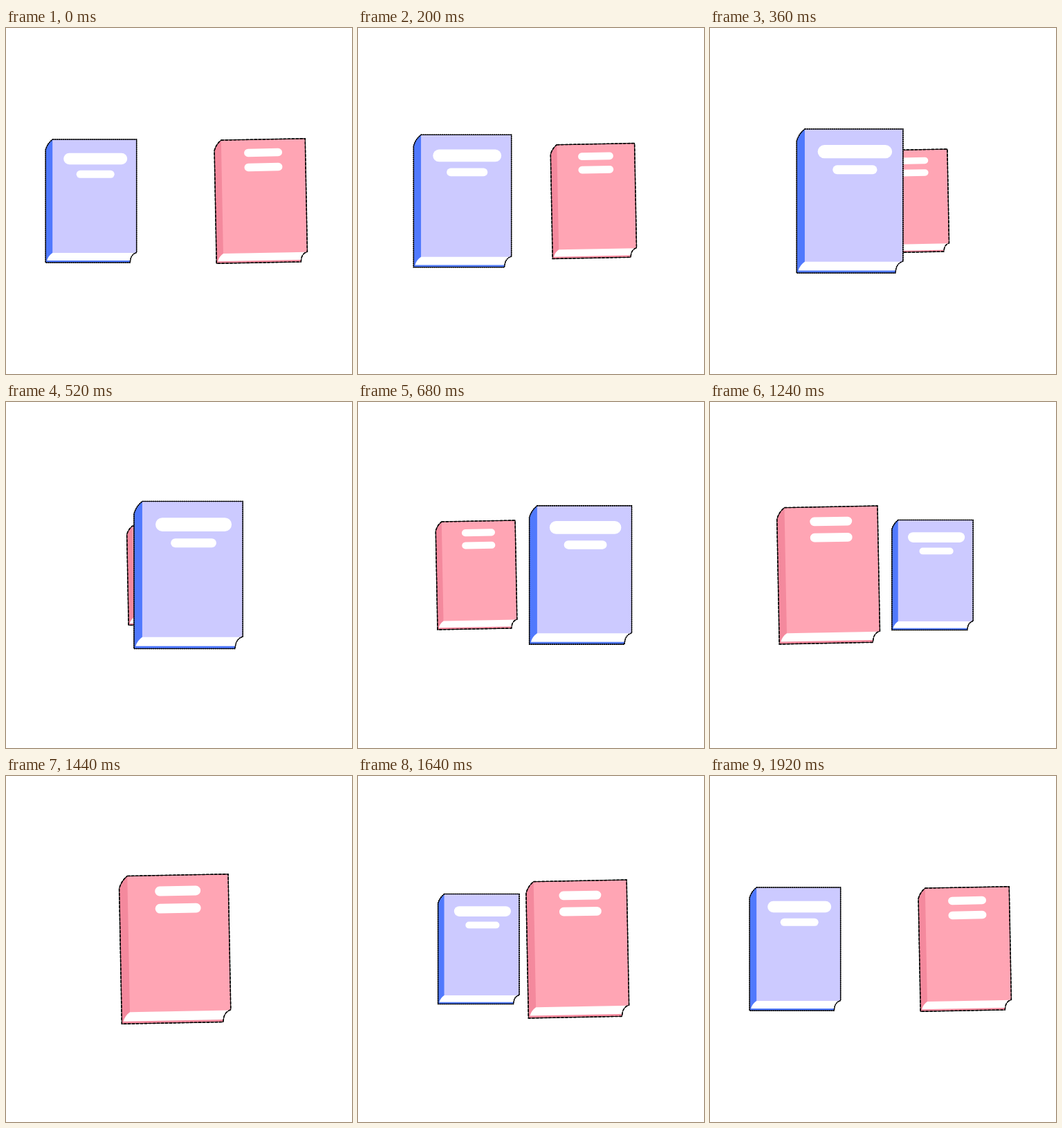
An HTML page with a canvas that plays this animation: 500 px wide and 500 px high, repeating every 1.96 s.

```html
<!DOCTYPE html>
<html lang="en">
<head>
<meta charset="utf-8">
<title>Two books trading places</title>
<style>
  html, body { margin: 0; width: 100%; height: 100%; overflow: hidden; background: #fff; }
  canvas { display: block; width: 500px; height: 500px; }
</style>
</head>
<body>
<canvas id="stage" width="500" height="500"></canvas>
<script>
const ctx = document.getElementById('stage').getContext('2d');

const LOOP = 1960, STEP = 40, SWAP = 960;

const blue = {
  cover: '#cccaff', spine: '#5079fd', tilt: 0, dash: [2, 1],
  mid: 247.7, reach: -125, // starts on the left
  labels: [[6.5, -61, 92, 16.5], [6.5, -38.7, 55, 11]]
};
const pink = {
  cover: '#ffa5b4', spine: '#f4899d', tilt: -1.1, dash: [4, 2],
  mid: 243.9, reach: 124.1,
  labels: [[4.9, -69.9, 55, 11.5], [4.9, -48.9, 55, 11.5]]
};

const ease = p => p * p * (3 - 2 * p);

// Eased steps between equally spaced values
function track(values, p) {
  const pos = p * (values.length - 1);
  const i = Math.min(Math.floor(pos), values.length - 2);
  return values[i] + (values[i + 1] - values[i]) * ease(pos - i);
}

function outline() {
  ctx.beginPath();
  ctx.moveTo(-55.5, -89);
  ctx.lineTo(66, -89);
  ctx.lineTo(66, 74.5);
  ctx.quadraticCurveTo(58, 77, 57, 86);
  ctx.lineTo(56.5, 89);
  ctx.lineTo(-65.5, 89);
  ctx.lineTo(-65.5, -74);
  ctx.quadraticCurveTo(-63, -83, -55.5, -89);
  ctx.closePath();
}

function cover() {
  ctx.beginPath();
  ctx.rect(-55.5, -89, 121.5, 164.5);
  ctx.fill();
}

function pages() {
  ctx.beginPath();
  ctx.moveTo(-55.5, 75);
  ctx.lineTo(66, 75);
  ctx.lineTo(66, 86);
  ctx.lineTo(-63.5, 86);
  ctx.quadraticCurveTo(-61.5, 79, -55.5, 75);
  ctx.fill();
}

function ink(width, dash, scale) {
  ctx.lineWidth = width / scale;
  ctx.setLineDash(dash.map(d => d / scale));
  ctx.stroke();
}

function drawBook(book, x, scale) {
  ctx.save();
  ctx.translate(x, 250);
  ctx.scale(scale, scale);
  ctx.rotate(book.tilt * Math.PI / 180);

  ctx.save();
  outline();
  ctx.fillStyle = book.spine;
  ctx.fill();
  ctx.clip();
  ctx.fillStyle = book.cover;
  cover();
  ctx.fillStyle = '#fff';
  pages();
  for (const [cx, cy, w, h] of book.labels) {
    ctx.beginPath();
    ctx.roundRect(cx - w / 2, cy - h / 2, w, h, h / 2);
    ctx.fill();
  }
  ctx.restore();

  // A fine solid line with heavier dashes on top
  outline();
  ctx.strokeStyle = '#000';
  ink(1, [], scale);
  ink(1.6, book.dash, scale);
  ctx.restore();
}

function draw(time) {
  const t = Math.min(Math.floor(time / STEP) * STEP, 2 * SWAP);
  const back = t >= SWAP;
  const p = (back ? t - SWAP : t) / SWAP;
  const travel = (1 - 2 * ease(p)) * (back ? -1 : 1);
  const grow = track(back ? [0, 0.1, 0.2, 0.1, 0] : [0, 0.2, 0], p);
  const [front, rear] = back ? [pink, blue] : [blue, pink];

  ctx.fillStyle = '#fff';
  ctx.fillRect(0, 0, 500, 500);
  drawBook(rear, rear.mid + rear.reach * travel, 1 - grow);
  drawBook(front, front.mid + front.reach * travel, 1 + grow);
}

const start = performance.now();
function tick() {
  draw((performance.now() - start) % LOOP);
  requestAnimationFrame(tick);
}
tick();
</script>
</body>
</html>
```
